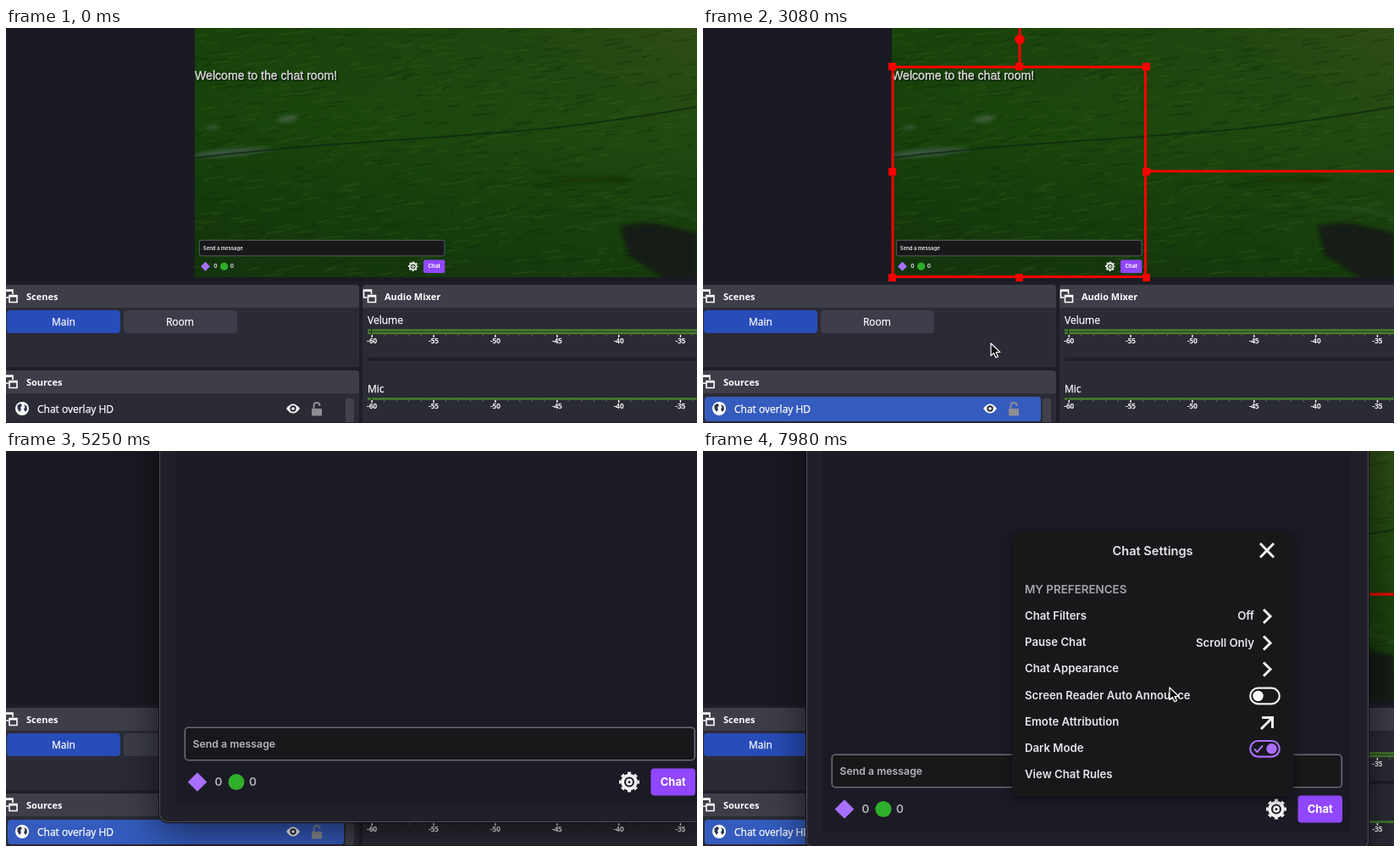
Write an HTML page that moves like this. It is 816x466 px and loops after 8 s.

```html
<!DOCTYPE html>
<html lang="en">
<head>
<meta charset="utf-8">
<title>Chat overlay setup</title>
<style>
  html, body { margin: 0; width: 100%; height: 100%; overflow: hidden; background: #1e1e28; }
  #stage { position: absolute; left: 0; top: 0; width: 816px; height: 466px; overflow: hidden; }
  svg { position: absolute; left: 0; top: 0; overflow: visible; }
  .ui { font: 12px "Open Sans", sans-serif; fill: #fff; }
  .ui text { stroke: #fff; stroke-width: .25px; }
  .ui .head { font-weight: 700; font-size: 11px; stroke: none; }
  .tick { font-size: 8px; font-weight: 600; text-anchor: middle; }
  .mid { text-anchor: middle; }
  .web { font: 600 13.2px Inter, sans-serif; fill: #e6e6ea; }
  .end { text-anchor: end; }
  #win {
    position: absolute; left: 122px; top: -300px; width: 664px; height: 770px;
    border-radius: 10px; background: #20202a; transform-origin: 332px 450px;
    box-shadow: inset 0 0 0 1px #50505b, 0 0 0 1px #0b0b10, 0 10px 50px rgba(0, 0, 0, .6);
  }
  #win svg { left: -122px; top: 300px; }
</style>
</head>
<body>
<div id="stage">
  <svg width="816" height="466">
    <defs>
      <linearGradient id="grass" x1="0" y1="1" x2="1" y2="0">
        <stop offset="0" stop-color="#143a0a"/>
        <stop offset=".45" stop-color="#1a460b"/>
        <stop offset=".8" stop-color="#224a10"/>
        <stop offset="1" stop-color="#345318"/>
      </linearGradient>
      <linearGradient id="shade" x1="0" y1="0" x2="0" y2="1">
        <stop offset="0" stop-color="#0a2a04" stop-opacity=".15"/>
        <stop offset=".4" stop-color="#0f2a10" stop-opacity="0"/>
        <stop offset="1" stop-color="#0f2a10" stop-opacity=".4"/>
      </linearGradient>
      <filter id="soft"><feGaussianBlur stdDeviation="2"/></filter>
      <clipPath id="photo"><path d="M223 0H816V294H223Z"/></clipPath>
      <g id="dock" fill="none" stroke="#fff" stroke-width="1.6">
        <path d="M4 9H0V0H9V5M0 1.200H9"/>
        <path d="M5 6.500H14V14.500H5ZM5 7.700H14"/>
      </g>
      <!-- message field and buttons, measured from the field's corner -->
      <g id="bar">
        <rect x=".8" y=".8" width="602" height="38.400" rx="4" fill="#18181b" stroke="#6b6b74" stroke-width="1.6"/>
        <g font-family="Inter, sans-serif" font-weight="600" font-size="12.3" fill="currentColor">
          <text x="10" y="24">Send a message</text>
          <text x="36" y="69.500" font-size="13.500">0</text>
          <text x="76.500" y="69.500" font-size="13.500">0</text>
        </g>
        <rect x="7.500" y="57" width="16" height="16" fill="#a970ff" transform="rotate(45 15.500 65)"/>
        <circle cx="61.500" cy="65" r="9.500" fill="#2fae2c"/>
        <g fill="none" stroke="#f2f2f4" transform="translate(525.500 65)">
          <circle r="7.900" stroke-width="3.800"/>
          <circle r="10.700" stroke-width="2.600" pathLength="16" stroke-dasharray="1" stroke-dashoffset=".5"/>
          <circle r="2.700" stroke-width="2.400"/>
        </g>
        <rect x="551" y="49" width="52.500" height="32" rx="4" fill="#9147ff"/>
        <text x="577.200" y="69.500" class="mid" font-family="Inter, sans-serif" font-weight="700" font-size="13" fill="#fff">Chat</text>
      </g>
    </defs>

    <rect width="816" height="466" fill="#1e1e28"/>
    <rect x="1" y="-5" width="830" height="304" rx="4" fill="#1a1a23"/>
    <g clip-path="url(#photo)">
      <rect x="223" width="593" height="294" fill="url(#grass)"/>
      <rect x="223" width="593" height="294" fill="url(#shade)"/>
      <g id="blades" fill="none" stroke-width="2"></g>
      <g filter="url(#soft)">
        <path d="M223 149Q265 138 318 143Q280 153 223 153Z" fill="#4b6158" opacity=".7"/>
        <path d="M318 110Q332 98 346 106Q336 114 318 110Z" fill="#566b5c" opacity=".6"/>
        <path d="M234 119Q244 112 253 116Q246 121 234 119Z" fill="#566b5c" opacity=".6"/>
        <path d="M620 186Q680 172 740 176L730 182Q680 180 620 186Z" fill="#123007" opacity=".7"/>
        <path d="M726 234Q760 226 790 236L816 242V296H778L735 268Z" fill="#141a12"/>
        <path d="M735 213Q780 209 816 226" fill="none" stroke="#4d6446" stroke-width="2" opacity=".5"/>
      </g>
      <path d="M223 153Q330 141 420 135T600 122T816 93" fill="none" stroke="#102a12" stroke-width="2" opacity=".8"/>
    </g>
    <text x="223" y="61" fill="#fff" stroke="#fff" stroke-width=".3" font-family="Liberation Sans, Arial, sans-serif" font-size="14.1" style="text-shadow:1px 1px 2px #000">Welcome to the chat room!</text>
    <use href="#bar" transform="translate(228 250) scale(.481)" color="#e8e8ec"/>

    <g id="outline" fill="#f00">
      <path d="M224 46H522.500V293.500H224ZM374 0V46M523 169H816" fill="none" stroke="#f00" stroke-width="3"/>
      <circle cx="374" cy="13.500" r="5.800"/>
      <g id="handles"></g>
    </g>

    <g class="ui">
      <path d="M0 303H413Q417 303 417 307V400H0Z" fill="#2a2b35"/>
      <path d="M0 303H413Q417 303 417 307V330H0Z" fill="#3d3e48"/>
      <path d="M0 404H413Q417 404 417 408V466H0Z" fill="#2a2b35"/>
      <path d="M0 404H413Q417 404 417 408V431H0Z" fill="#3d3e48"/>
      <path d="M425 303H816V466H421V307Q421 303 425 303Z" fill="#2a2b35"/>
      <path d="M425 303H816V330H421V307Q421 303 425 303Z" fill="#3d3e48"/>
      <use href="#dock" x="-1" y="309"/>
      <use href="#dock" x="-1" y="410"/>
      <use href="#dock" x="422.500" y="309"/>
      <text class="head" x="24" y="321">Scenes</text>
      <text class="head" x="24" y="422">Sources</text>
      <text class="head" x="447" y="321">Audio Mixer</text>
      <rect x="1" y="333" width="134" height="27" rx="4" fill="#284cb8"/>
      <rect x="139" y="333" width="134" height="27" rx="4" fill="#3c3d48"/>
      <text class="mid" x="68" y="351">Main</text>
      <text class="mid" x="205.500" y="351">Room</text>

      <rect x="401" y="437" width="10" height="34" rx="3" fill="#41424c"/>
      <rect id="picked" x="2" y="435" width="397" height="29" rx="4" fill="#345bbd"/>
      <circle cx="19" cy="449" r="8"/>
      <path d="M13.500 445L17 443 19 445 17 448 18 450 16 453 13.500 449ZM21 444L24.500 446 25 450 23 453 21 450 22.500 447Z" fill="#2b3550"/>
      <text x="37" y="454">Chat overlay HD</text>
      <path d="M331 449Q339 438 347 449Q339 460 331 449Z"/>
      <circle cx="339" cy="449" r="3.700" fill="#2a2b35"/>
      <circle cx="339" cy="449" r="1.800"/>
      <rect x="361" y="449" width="12" height="8.500" rx="1" fill="#8d8e94"/>
      <path d="M363.500 449V446Q363.500 442 367 442T370.500 446" fill="none" stroke="#8d8e94" stroke-width="2"/>

      <text x="427" y="349">Velume</text>
      <text x="427" y="430">Mic</text>
      <path d="M427 391H816" stroke="#1e1f28" stroke-width="4"/>
      <path d="M427 356.500H816M427 360H816M427 437.500H816" stroke="#47802a" stroke-width="2.600"/>
      <path d="M431.500 355V362M431.500 436V439" stroke="#1c2a18"/>
      <g id="ticks"></g>
      <path d="M0 465.500H816" stroke="#2a1c2c"/>
    </g>

    <g id="menu" class="ui">
      <rect x="239" y="-10" width="218" height="457" rx="4" fill="#1f1f29" stroke="#111118" style="filter:drop-shadow(0 2px 4px rgba(0,0,0,.5))"/>
      <rect id="hot" x="242" width="212" height="29" rx="3" fill="#1c4fc0"/>
    </g>
  </svg>

  <div id="win">
    <svg width="816" height="466">
      <rect x="141" y="-270" width="624" height="720" fill="#1b1b25"/>
      <g id="page">
        <rect id="gearHot" x="657" y="407" width="40" height="32" rx="4" fill="#2c2c36"/>
        <use href="#bar" x="151.500" y="357.500" color="#b4b4ba"/>
      </g>
      <g id="panel" class="web">
        <rect x="365" y="95" width="332" height="312" rx="6" fill="#18181b" style="filter:drop-shadow(0 3px 6px rgba(0,0,0,.5))"/>
        <rect id="rowHot" x="375" width="312" height="29" rx="4" fill="#303036"/>
        <text class="mid" x="531" y="123" font-size="14.6">Chat Settings</text>
        <text x="380" y="168" font-size="13.400" style="fill:#a5a5ae">MY PREFERENCES</text>
        <text class="end" x="651" y="199">Off</text>
        <text class="end" x="651" y="230.500">Scroll Only</text>
        <g fill="none" stroke="#f0f0f2" stroke-width="3">
          <path d="M658 109L674 125.500M674 109L658 125.500"/>
          <path d="M662 187L670 195 662 203M662 218.500L670 226.500 662 234.500M662 249.500L670 257.500 662 265.500"/>
          <path d="M660 314.500H672.500V327M672 315L659 328"/>
          <rect x="646.200" y="279.700" width="34.600" height="18.600" rx="9.300" stroke-width="2.200"/>
          <rect x="646.200" y="342" width="34.600" height="18.600" rx="9.300" stroke="#a970ff" stroke-width="2.200"/>
          <path d="M651 351.500L654.500 355 661 347.500" stroke="#a970ff" stroke-width="2"/>
        </g>
        <circle cx="655.500" cy="289" r="6.200" fill="#fff"/>
        <circle cx="671.500" cy="351.300" r="6.200" fill="#a970ff"/>
      </g>
    </svg>
  </div>

  <svg width="816" height="466">
    <path id="cursor" d="M0 0V14.500L3.400 11.400 5.800 16.800 8.400 15.700 6.100 10.500H10.800Z" fill="#0c0c0f" stroke="#fff" stroke-width="1.200" stroke-linejoin="round"/>
  </svg>
</div>

<script>
const LOOP = 8000, STEP = 70;
const $ = id => document.getElementById(id);

function add(parent, tag, attrs, text) {
  const el = document.createElementNS('http://www.w3.org/2000/svg', tag);
  for (const k in attrs) el.setAttribute(k, attrs[k]);
  if (text) el.textContent = text;
  return $(parent).appendChild(el);
}

// soft streaks in the grass
let seed = 7;
const rnd = () => (seed = seed * 16807 % 2147483647) / 2147483647;
for (const [stroke, opacity] of [['#0c2808', .3], ['#3f6a1c', .22]]) {
  let d = '';
  for (let i = 0; i < 420; i++) {
    const w = 6 + rnd() * 18;
    d += `M${(215 + rnd() * 600).toFixed(1)} ${(rnd() * 294).toFixed(1)}q${(w / 2).toFixed(1)} -2 ${w.toFixed(1)} -3`;
  }
  add('blades', 'path', { d, stroke, opacity });
}

// selection handles: a 3 by 3 grid without its centre
for (const x of [223, 373, 523]) for (const y of [45, 169, 294])
  if (x !== 373 || y !== 169) add('handles', 'rect', { x: x - 4, y: y - 4, width: 9, height: 9 });

// meter scales
for (const y of [362, 439]) for (let i = 0; i < 27; i++) {
  const x = 431.5 + i * 14.57, major = i % 5 === 0;
  add('ticks', 'rect', { x, y, width: major ? 1.4 : 1, height: major ? 3 : 2, fill: major ? '#fff' : '#6a6b74' });
  if (major) add('ticks', 'text', { x: x + .7, y: y + 10, class: 'tick' }, String(-60 + i));
}

// context menu: label, centre line, has submenu
[['Transform', 17, 1], ['Hide in Mixer', 53], ['Resize output (source size)', 89],
 ['Scale Filtering', 118, 1], ['Blending Mode', 147, 1], ['Blending Method', 176, 1],
 ['Show Transition', 212, 1], ['Hide Transition', 241, 1], ['Fullscreen Projector (Source)', 277, 1],
 ['Windowed Projector (Source)', 306], ['Screenshot (Source)', 335],
 ['Interact', 371], ['Filters', 400], ['Properties', 429]
].forEach(([label, y, sub]) => {
  add('menu', 'text', { x: 268, y: y + 4.5 }, label);
  if (sub) add('menu', 'path', { d: `M443 ${y - 5.5}L449 ${y}L443 ${y + 5.5}Z` });
});
for (const y of [35, 71, 194, 259, 353])
  add('menu', 'rect', { x: 248, y, width: 200, height: 1, fill: '#484952' });

const rowY = i => 199 + i * 31.2;
['Chat Filters', 'Pause Chat', 'Chat Appearance', 'Screen Reader Auto Announce',
 'Emote Attribution', 'Dark Mode', 'View Chat Rules'
].forEach((label, i) => add('panel', 'text', { x: 380, y: rowY(i) }, label));

// keys: time, x, y
const POINTER = [
  [70, 494, 51], [280, 110, 420], [350, 58, 446], [490, 237, 448], [1190, 237, 448],
  [1960, 340, 372], [3290, 340, 372], [3640, 256, 266], [3710, 256, 266], [3850, 776, 29],
  [6089, 776, 29], [6090, 566, 132], [6160, 566, 169], [6300, 566, 169], [6930, 672, 427],
  [7140, 671, 428], [7560, 671, 428], [7980, 551, 279]
];
const WINDOW = [
  [0, 399, -134], [4620, 399, -134], [4900, 87, -52], [5040, 87, -52],
  [5600, 0, 10], [5810, 0, 0]
];

const clamp = v => Math.max(0, Math.min(1, v));
const ease = v => v * v * (3 - 2 * v);

function at(keys, t) {
  let i = 0;
  while (i < keys.length - 2 && t >= keys[i + 1][0]) i++;
  const [t0, x0, y0] = keys[i], [t1, x1, y1] = keys[i + 1];
  const k = ease(clamp((t - t0) / (t1 - t0)));
  return [Math.round(x0 + (x1 - x0) * k), Math.round(y0 + (y1 - y0) * k)];
}

const show = (id, on) => { $(id).style.display = on ? '' : 'none'; };

function draw(t) {
  const [x, y] = at(POINTER, t);
  show('cursor', t >= 70 && t < 3920 || t >= 6090);
  $('cursor').setAttribute('transform', `translate(${x} ${y})`);

  show('picked', t >= 840);
  show('outline', t >= 910);
  show('menu', t >= 980 && t < 3010);
  show('hot', x > 241 && y >= 357 && y < 444);
  $('hot').setAttribute('y', 357 + 29 * Math.floor((y - 357) / 29));

  const open = ease(clamp((t - 3080) / 280));
  const [wx, wy] = at(WINDOW, t);
  show('win', open > 0);
  $('win').style.opacity = open;
  $('win').style.transform = `translate(${wx}px, ${wy}px) scale(${.85 + .15 * open})`;
  show('page', t >= 3500);
  show('gearHot', t > 6300 && x >= 657 && x <= 697 && y >= 407 && y <= 439);

  const fade = clamp((t - 7210) / 280);
  show('panel', fade > 0);
  $('panel').style.opacity = fade;
  const row = Math.floor((y - 179) / 31.2);
  show('rowHot', t > 7560 && (row === 4 || row === 6));
  $('rowHot').setAttribute('y', rowY(row) - 19);
}

const start = performance.now();
let last = -1;
function tick() {
  const t = Math.floor((performance.now() - start) % LOOP / STEP) * STEP;
  if (t !== last) draw(last = t);
  requestAnimationFrame(tick);
}
tick();
</script>
</body>
</html>
```
